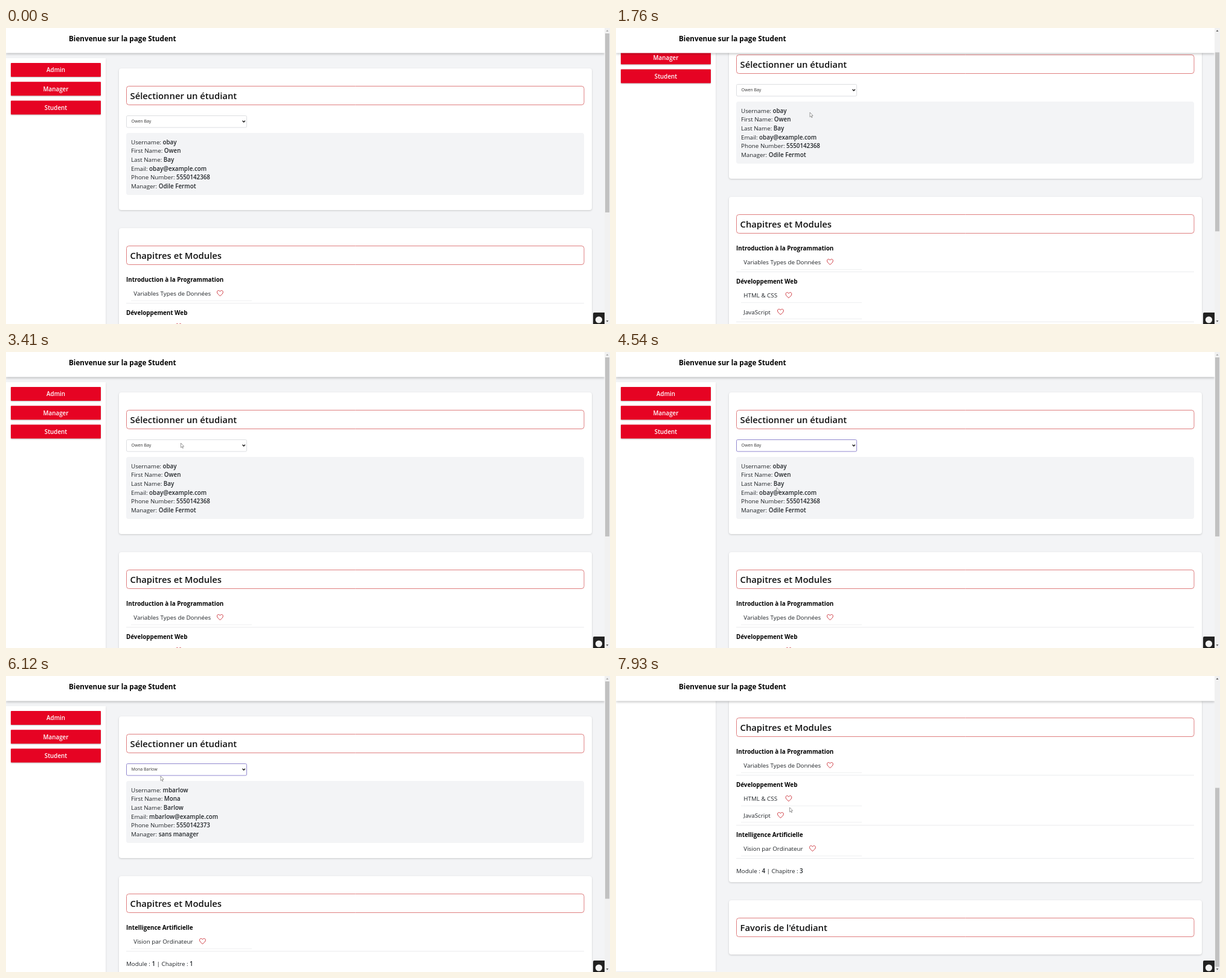
An HTML page with a canvas that plays this animation: 1000 px wide and 491 px high, repeating every 7990 ms.

```html
<!DOCTYPE html>
<html lang="fr">
<head>
<meta charset="utf-8">
<title>Student</title>
<style>
html, body { margin: 0; width: 100%; height: 100%; overflow: hidden; background: #f3f4f6; }
canvas { display: block; width: 100vw; height: 100vh; }
</style>
</head>
<body>
<canvas id="stage" width="1000" height="491"></canvas>
<script>
const ctx = document.getElementById('stage').getContext('2d');
const W = 1000, H = 491, LOOP = 7990;
const RED = '#e60323', GRAY = '#f3f4f6', INK = '#212529', BODY = 9.8;

const intro = ['Introduction à la Programmation', ['Variables Types de Données', 349]];
const web = ['Développement Web', ['HTML & CSS', 280.5], ['JavaScript', 267]];
const vision = ['Intelligence Artificielle', ['Vision par Ordinateur', 320]];

const owen = {
  name: 'Owen Bay', chapters: [intro, web, vision],
  info: [['Username', 'obay'], ['First Name', 'Owen'], ['Last Name', 'Bay'],
    ['Email', 'obay@example.com'], ['Phone Number', '5550142368'], ['Manager', 'Odile Fermot']]
};
const mona = {
  name: 'Mona Barlow', chapters: [vision],
  info: [['Username', 'mbarlow'], ['First Name', 'Mona'], ['Last Name', 'Barlow'],
    ['Email', 'mbarlow@example.com'], ['Phone Number', '5550142373'], ['Manager', 'sans manager']]
};

// Held values: [start time, value]
const scrolls = [[0, 0], [1760, 52], [2700, 104], [2960, 52], [3090, 0], [7240, 52],
  [7320, 104], [7400, 156], [7500, 208], [7640, 260], [7890, 292]];
const students = [[0, owen], [4900, mona], [6350, owen]];
const FOCUS_AT = 3560;

// Pointer path: [time, x, y]
const path = [[130, 440, 322], [390, 372, 214], [700, 372, 214], [850, 321, 140],
  [3090, 321, 140], [3410, 289.5, 151], [3560, 284, 153], [3790, 268, 222], [4530, 268, 222],
  [4540, 266, 225], [4850, 265, 223], [5320, 262, 157], [5410, 262, 157], [5700, 258, 155],
  [6120, 256, 166], [6500, 256, 166], [6750, 280, 206], [6950, 287.5, 218]];

function held(track, t) {
  let value = track[0][1];
  for (const [at, v] of track) if (t >= at) value = v;
  return value;
}

function pointerAt(t) {
  if (t < path[0][0]) return null;
  const i = path.findIndex(p => p[0] > t);
  if (i < 0) return path[path.length - 1].slice(1);
  const [t0, x0, y0] = path[i - 1], [t1, x1, y1] = path[i];
  const k = (t - t0) / (t1 - t0);
  return [x0 + (x1 - x0) * k, y0 + (y1 - y0) * k];
}

function rect(x, y, w, h, color) {
  ctx.fillStyle = color;
  ctx.fillRect(x, y, w, h);
}

function rounded(x, y, w, h, r, fill, stroke) {
  ctx.beginPath();
  ctx.roundRect(x, y, w, h, r);
  if (fill) { ctx.fillStyle = fill; ctx.fill(); }
  if (stroke) { ctx.strokeStyle = stroke; ctx.lineWidth = 1; ctx.stroke(); }
}

function shadowed(draw, blur = 3, alpha = 0.18) {
  ctx.save();
  ctx.shadowColor = `rgba(0,0,0,${alpha})`;
  ctx.shadowBlur = blur;
  ctx.shadowOffsetY = 1;
  draw();
  ctx.restore();
}

// Draws text around the middle line y and returns its right end.
function text(s, x, y, size, weight = 400, color = INK, align = 'left') {
  ctx.font = `${weight} ${size}px "Open Sans", "Noto Sans", sans-serif`;
  ctx.textAlign = align;
  ctx.fillStyle = color;
  ctx.fillText(s, x, y + size * 0.35);
  return x + ctx.measureText(s).width;
}

// Alternates regular and semibold pieces on one line.
function mixed(parts, x, y) {
  parts.forEach((s, i) => { x = text(s, x, y, BODY, i % 2 ? 600 : 400); });
}

function card(y, h, title) {
  shadowed(() => rounded(187, y, 783, h, 4, '#fff'));
  rounded(199.5, y + 29.5, 757.5, 31, 4, '#fff', '#df7f80');
  text(title, 205.5, y + 46, 14.8, 600, '#111');
}

function heart(x, y) {
  ctx.save();
  ctx.translate(x + 5.4, y);
  ctx.beginPath();
  for (const s of [-1, 1]) {
    ctx.moveTo(0, 4.6);
    ctx.bezierCurveTo(s * 2.2, 2.6, s * 4.9, 0.8, s * 4.9, -1.7);
    ctx.bezierCurveTo(s * 4.9, -5, s * 1.4, -5.4, 0, -2.7);
  }
  ctx.strokeStyle = '#cf3a42';
  ctx.lineWidth = 1;
  ctx.stroke();
  ctx.restore();
}

function sidebar(pageH) {
  shadowed(() => rect(0, 50, 165, pageH - 50, '#fff'), 3, 0.12);
  ['Admin', 'Manager', 'Student'].forEach((label, i) => {
    const y = 58 + i * 31.3;
    shadowed(() => rounded(8, y, 149, 23, 1, RED), 2, 0.25);
    text(label, 82.5, y + 12, BODY, 600, '#fff', 'center');
  });
}

function selectBox(name, focused) {
  rounded(199.5, 145.5, 199, 19.5, 2, '#fff', focused ? '#9288cf' : '#dcdee1');
  text(name, 207.5, 155, 7, 400, '#333');
  ctx.beginPath();
  ctx.moveTo(391.5, 153.8);
  ctx.lineTo(393.7, 156);
  ctx.lineTo(395.9, 153.8);
  ctx.strokeStyle = '#111';
  ctx.lineWidth = 1.3;
  ctx.stroke();
}

function details(info) {
  rounded(199, 174, 758, 103, 4, GRAY);
  info.forEach(([label, value], i) => mixed([label + ': ', value], 207, 189.5 + i * 14.55));
}

function chapterHeight(ch) {
  return 55.2 + 27.7 * (ch.length - 2);
}

function chaptersHeight(chapters) {
  return chapters.reduce((sum, ch) => sum + chapterHeight(ch), 0);
}

// Returns the bottom of the chapter card.
function chapterCard(chapters) {
  const bottom = Math.round(441 + chaptersHeight(chapters));
  card(332, bottom - 332, 'Chapitres et Modules');
  let y = 417.5, count = 0;
  for (const ch of chapters) {
    text(ch[0], 199, y, BODY, 700, '#000');
    ch.slice(1).forEach(([name, heartX], i) => {
      const my = y + 23 + i * 27.7;
      text(name, 211.3, my, BODY);
      heart(heartX, my - 0.6);
      rect(207, Math.round(my + 11), 200, 1, '#eff0f1');
      count++;
    });
    y += chapterHeight(ch);
    rect(199, Math.round(y - 16.5), 758, 1, '#ebecee');
  }
  mixed(['Module : ', String(count), ' | Chapitre : ', String(chapters.length)], 199, y + 4.5);
  return bottom;
}

function header() {
  shadowed(() => rect(0, 0, 991, 41.5, '#fff'), 4, 0.25);
  text('Bienvenue sur la page Student', 104, 17.5, 11.7, 700, '#000');
}

function triangle(y, dir, color) {
  ctx.beginPath();
  ctx.moveTo(993.5, y + dir);
  ctx.lineTo(997.5, y + dir);
  ctx.lineTo(995.5, y - dir);
  ctx.fillStyle = color;
  ctx.fill();
}

function scrollbar(scroll, pageH) {
  const track = 473;
  rect(991, 0, 9, H, '#f1f1f1');
  rect(992, 9 + scroll * track / pageH, 7, H * track / pageH, '#c1c1c1');
  triangle(4.5, 1.2, scroll ? '#505050' : '#a3a3a3');
  triangle(486.5, -1.2, '#505050');
}

function badge() {
  rounded(972, 472, 19, 19, [2, 0, 0, 0], '#222');
  ctx.beginPath();
  ctx.arc(981.5, 484, 5.6, 0, 7);
  ctx.fillStyle = '#f5f5f5';
  ctx.fill();
}

function arrow(x, y) {
  const shape = [[0, 0], [0, 7.6], [1.8, 6], [2.9, 8.7], [4, 8.2], [2.9, 5.6], [5.1, 5.4]];
  ctx.beginPath();
  shape.forEach(([dx, dy]) => ctx.lineTo(x + dx, y + dy));
  ctx.closePath();
  ctx.fillStyle = '#fff';
  ctx.fill();
  ctx.strokeStyle = '#707070';
  ctx.lineWidth = 0.7;
  ctx.stroke();
}

function ibeam(x, y) {
  rect(x - 1.5, y, 3.5, 0.8, '#444');
  rect(x, y, 0.8, 8.5, '#444');
  rect(x - 1.5, y + 8, 3.5, 0.8, '#444');
}

function draw(t) {
  const scroll = held(scrolls, t), student = held(students, t);
  const pageH = 589 + chaptersHeight(student.chapters);

  rect(0, 0, W, H, GRAY);
  ctx.save();
  ctx.translate(0, -scroll);
  sidebar(pageH);
  card(67, 235, 'Sélectionner un étudiant');
  selectBox(student.name, t >= FOCUS_AT);
  details(student.info);
  const bottom = chapterCard(student.chapters);
  card(bottom + 30, 90, "Favoris de l'étudiant");
  ctx.restore();

  header();
  scrollbar(scroll, pageH);
  badge();

  const pointer = pointerAt(t);
  if (pointer) (t >= 2700 && t < 2960 ? ibeam : arrow)(...pointer);
}

function tick() {
  draw(performance.now() % LOOP);
  requestAnimationFrame(tick);
}
tick();
</script>
</body>
</html>
```
